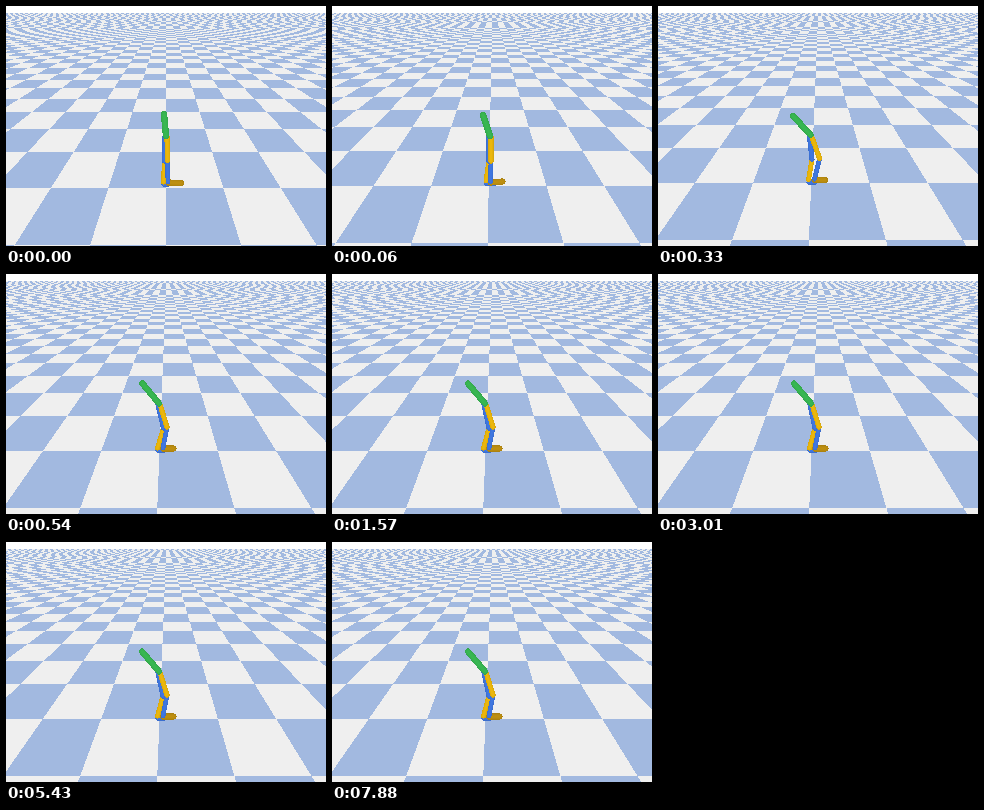
Write an HTML page with a canvas that moves like this. It is 320 by 240 pixels and loops after 8 s.

```html
<!DOCTYPE html>
<html lang="en">
<head>
<meta charset="utf-8">
<title>Walker on a checkered plane</title>
<style>
  html, body { margin: 0; width: 100%; height: 100%; overflow: hidden; background: #fff; }
  canvas { display: block; width: 100vw; height: 100vh; image-rendering: pixelated; }
</style>
</head>
<body>
<canvas id="stage" width="320" height="240"></canvas>
<script>
const W = 320, H = 240, LOOP = 8000, STEP = 30;
const SKY_ROWS = 7;
const COS = Math.cos(Math.PI / 6);
const CAM_BACK = 3 * COS;          // camera: 3 m away, pitched 30° down, 60° field of view

const WHITE = [239, 239, 239], BLUE_TILE = [162, 185, 224];
const GREEN = [54, 178, 80], YELLOW = [229, 178, 12], BLUE = [62, 116, 218], GOLD = [184, 139, 16];

// time, camera x and height, then x,y of: head, hip,
// front knee, ankle, toe, back knee, ankle, toe
const KEYS = [
  [0,    0.012, 2.75,  158, 108,   160, 130,  161.5, 154.5, 162, 176,  175, 177,  158.5, 155, 157.5, 176,  162, 178.5],
  [60,   0.065, 2.708, 151, 109,   158, 130,  159, 155,  158.5, 176,   170.5, 175.5,  157, 155, 154, 175,  162, 178],
  [180,  0.118, 2.655, 136.5, 110, 153, 128.5,  161.5, 152.5, 156.5, 173,  167, 174,  152, 153, 150.5, 174,  158, 176.5],
  [540,  0.12,  2.636, 136.5, 109.5, 153, 129.5,  161, 153, 157, 174,  167.5, 174.5,  157.5, 154, 151.5, 174,  158, 176.5],
  [1230, 0.12,  2.633, 136, 109.5, 153, 129.5,  161, 153, 157, 174,  167.5, 174.5,  157, 154, 151.5, 174,  158, 176.5]
];

// Hermite curve through the keys, at rest after the last one
function poseAt(t) {
  const last = KEYS.length - 1;
  if (t >= KEYS[last][0]) return KEYS[last];
  let i = 0;
  while (t >= KEYS[i + 1][0]) i++;
  const a = KEYS[i], b = KEYS[i + 1], span = b[0] - a[0], u = (t - a[0]) / span;
  const before = KEYS[Math.max(0, i - 1)], after = KEYS[Math.min(last, i + 2)];
  const u2 = u * u, u3 = u2 * u;
  return a.map((p, n) => {
    const m0 = (b[n] - before[n]) / (b[0] - before[0]) * span;
    const m1 = i + 1 === last ? 0 : (after[n] - p) / (after[0] - a[0]) * span;
    return (2 * u3 - 3 * u2 + 1) * p + (u3 - 2 * u2 + u) * m0 +
           (3 * u2 - 2 * u3) * b[n] + (u3 - u2) * m1;
  });
}

const ctx = document.getElementById("stage").getContext("2d");
const image = ctx.createImageData(W, H);
const pixels = image.data.fill(255);

function plot(x, y, color, light) {
  const i = (y * W + x) * 4;
  for (let c = 0; c < 3; c++) pixels[i + c] = color[c] * light;
}

function drawFloor(camX, camH) {
  for (let row = SKY_ROWS; row < H; row++) {
    const y = row + 1;
    const scale = camH / (COS * y);
    const tileY = Math.floor(scale * (240 - y / 2) - CAM_BACK);
    for (let x = 0; x < W; x++) {
      const tileX = Math.floor((x - W / 2) * scale + camX);
      plot(x, row, (tileX + tileY) & 1 ? BLUE_TILE : WHITE, 1);
    }
  }
}

function drawCapsule([ax, ay], [bx, by], r, color) {
  const dx = bx - ax, dy = by - ay, len2 = dx * dx + dy * dy || 1;
  const x1 = Math.ceil(Math.max(ax, bx) + r), y1 = Math.ceil(Math.max(ay, by) + r);
  for (let y = Math.floor(Math.min(ay, by) - r); y <= y1; y++) {
    for (let x = Math.floor(Math.min(ax, bx) - r); x <= x1; x++) {
      const px = x + 0.5 - ax, py = y + 0.5 - ay;
      const k = Math.min(1, Math.max(0, (px * dx + py * dy) / len2));
      const d = Math.hypot(px - k * dx, py - k * dy) / r;
      if (d <= 1) plot(x, y, color, 1.03 - 0.1 * d * d);
    }
  }
}

function drawWalker(pose) {
  const joint = n => [pose[3 + n * 2], pose[4 + n * 2]];
  const [head, hip, kneeF, ankleF, toeF, kneeB, ankleB, toeB] = [0, 1, 2, 3, 4, 5, 6, 7].map(joint);
  const shift = ([x, y], dx, dy) => [x + dx, y + dy];
  drawCapsule(shift(ankleB, 0, 2.5), toeB, 2.2, BLUE);
  drawCapsule(shift(ankleF, 0, 0.5), toeF, 3.1, GOLD);
  drawCapsule(kneeB, ankleB, 2.5, YELLOW);
  drawCapsule(shift(hip, -1, 1), kneeB, 2.6, BLUE);
  drawCapsule(kneeF, ankleF, 2.4, BLUE);
  drawCapsule(shift(hip, 1, 1), kneeF, 2.6, YELLOW);
  drawCapsule(head, hip, 3.2, GREEN);
}

function render(ms) {
  const pose = poseAt(Math.floor(ms / STEP) * STEP);
  drawFloor(pose[1], pose[2]);
  drawWalker(pose);
  ctx.putImageData(image, 0, 0);
}

const start = performance.now();
function tick() {
  render((performance.now() - start) % LOOP);
  requestAnimationFrame(tick);
}
tick();
</script>
</body>
</html>
```
